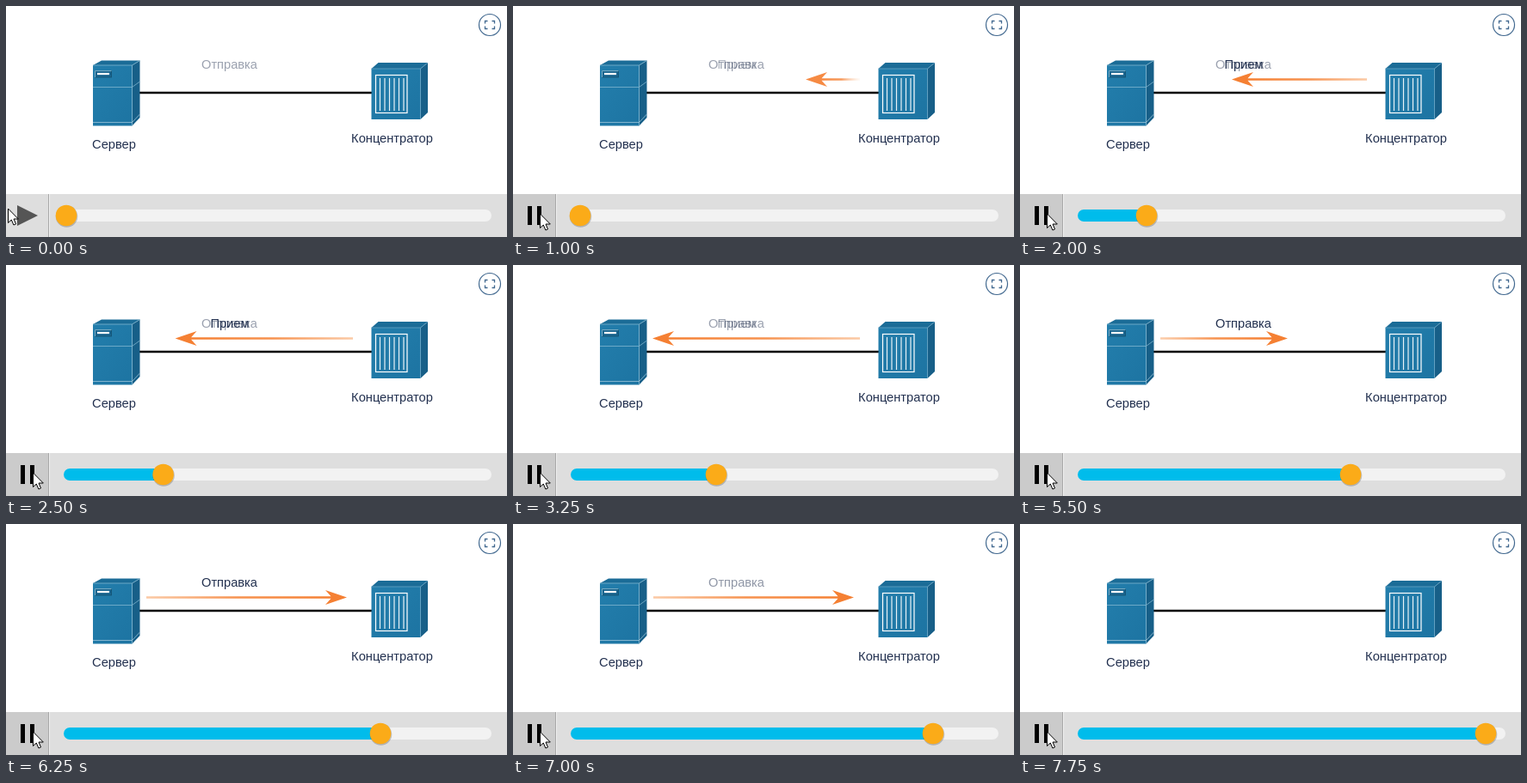
An HTML page for the animation above (8 s loop, 582 by 269 pixels).

```html
<!DOCTYPE html>
<html lang="ru">
<head>
<meta charset="utf-8">
<style>
  html, body { margin: 0; width: 100%; height: 100%; overflow: hidden; background: #fff; }
  svg { display: block; width: 582px; height: 269px; }
  text { font: 14.67px "Liberation Sans", Arial, sans-serif; fill: #22304f; text-anchor: middle; }
</style>
</head>
<body>
<svg viewBox="0 0 582 269">
  <defs>
    <linearGradient id="fade" gradientUnits="userSpaceOnUse" x1="20" x2="240" y1="0" y2="0">
      <stop offset="0" stop-color="#f58033"/>
      <stop offset=".5" stop-color="#f6924f"/>
      <stop id="tail" offset="1" stop-color="#fbcaa6"/>
    </linearGradient>
    <linearGradient id="face" x1="0" x2="1" y1="0" y2="1">
      <stop offset="0" stop-color="#237eac"/>
      <stop offset="1" stop-color="#1d74a2"/>
    </linearGradient>
  </defs>
  <rect width="582" height="269" fill="#fff"/>

  <g fill="none" stroke="#41688f">
    <circle cx="562" cy="22" r="12.5" stroke-width="1.2"/>
    <path d="M556.5 20.5v-3h3M564.5 17.5h3v3M567.5 23.5v3h-3M559.5 26.5h-3v-3" stroke-width="1.3"/>
  </g>

  <path d="M154 101H425" stroke="#000" stroke-width="2.6"/>

  <g id="server">
    <path d="M101 69L111 63.5H155.5L146.500 69Z" fill="#1b6c97"/>
    <path d="M146.500 69L155.500 63.500V130L146.500 139.500Z" fill="#175f88"/>
    <rect x="101" y="69" width="45.500" height="70.500" fill="url(#face)"/>
    <path d="M101 69H146.500L155.500 63.500M146.500 69V139.500M101 94.500H146.500L155.500 88" fill="none" stroke="#7fb5d0" stroke-width=".8"/>
    <path d="M101 135.500H146.500L155.500 126" fill="none" stroke="#9cc5da" stroke-width=".8"/>
    <rect x="103.500" y="75.500" width="19" height="7.500" fill="#1a658f" stroke="#12506f" stroke-width=".8"/>
    <path d="M103.500 83V75.500H122.500" fill="none" stroke="#8fbfd6" stroke-width=".8"/>
    <path d="M106 79H120" stroke="#fff" stroke-width="2.200"/>
  </g>

  <g id="hub">
    <path d="M424.500 73L432.500 66H490L481.500 73Z" fill="#1b6c97"/>
    <path d="M481.500 73L490 66V124L481.500 132Z" fill="#175f88"/>
    <rect x="424.500" y="73" width="57" height="59" fill="url(#face)"/>
    <path d="M424.500 73H481.500L490 66M481.500 73V132" fill="none" stroke="#66a4c4" stroke-width=".8"/>
    <rect x="429.500" y="80.500" width="36.500" height="44" fill="none" stroke="#fff" stroke-width="1.200"/>
    <path d="M434.500 84V122M440 84V122M445.500 84V122M451 84V122M456.500 84V122M462 84V122" stroke="#e8f2f7" stroke-width="1.200"/>
  </g>

  <text x="125.500" y="166">Сервер</text>
  <text x="448.500" y="159">Концентратор</text>
  <text id="send" x="259.500" y="73">Отправка</text>
  <text id="receive" x="260" y="73">Прием</text>

  <path id="arrow" fill="url(#fade)"/>

  <rect y="219" width="582" height="50" fill="#dedede"/>
  <rect id="button" y="219" width="49" height="50"/>
  <path d="M49.500 219V269" stroke="#a8a8a8"/>
  <path d="M50.500 219V269" stroke="#f0f0f0"/>
  <path id="play" d="M13 232L37 244L13 256Z" fill="#555"/>
  <path id="pause" d="M17 233h5v22h-5zM28 233h5v22h-5z" fill="#000"/>
  <rect x="67" y="237" width="497" height="14" rx="7" fill="#f2f2f2"/>
  <rect id="fill" x="67" y="237" height="14" rx="7" fill="#00bceb"/>
  <g id="knob">
    <circle cx=".5" cy="1" r="12.800" fill="#000" opacity=".2"/>
    <circle r="12.300" fill="#fbab18"/>
  </g>
  <path id="cursor" d="M0 0V16.500L3.800 13L6.400 19L9 17.900L6.500 12H11.800Z" fill="#fff" stroke="#000" stroke-linejoin="round"/>
</svg>
<script>
  const LOOP = 8000, STEP = 250;
  const $ = id => document.getElementById(id);
  const set = (id, attrs) => {
    for (const k in attrs) $(id).setAttribute(k, attrs[k]);
  };

  // Linear interpolation through [time, value] pairs
  function track(t, keys) {
    if (t <= keys[0][0]) return keys[0][1];
    for (let i = 1; i < keys.length; i++) {
      const [a, u] = keys[i - 1], [b, v] = keys[i];
      if (t <= b) return u + (v - u) * (t - a) / (b - a);
    }
    return keys[keys.length - 1][1];
  }

  // Arrow drawn pointing left from its tip at 0
  function drawArrow(t) {
    const back = t < 4250;
    const tip = back
      ? track(t, [[1000, 340], [2000, 246], [2850, 162]])
      : track(t, [[4750, 226], [6250, 396]]);
    const len = back ? 403 - tip : tip - 163;
    const alpha = back
      ? track(t, [[750, 0], [1000, .92], [1250, 1], [3250, 1], [3750, 0]])
      : track(t, [[4500, 0], [4750, .92], [5000, 1], [7000, 1], [7750, 0]]);
    set('arrow', {
      d: `M0 0L25 -8.500L18.500 -1.300H${len}V1.300H18.500L25 8.500Z`,
      transform: `translate(${tip} 85.500) scale(${back ? 1 : -1} 1)`,
      opacity: alpha
    });
    set('fade', { x2: len });
    set('tail', { 'stop-opacity': track(len, [[63, .1], [155, 1]]) });
  }

  function draw(t) {
    const playing = t >= 1000;
    const knob = track(t, [[880, 70], [1000, 78], [2000, 147], [3250, 236], [4500, 316], [6250, 435], [7750, 541]]);
    drawArrow(t);
    set('send', { opacity: track(t, [[4500, .45], [5000, 1], [6500, 1], [7500, 0]]) * (t < 7750) });
    set('receive', { opacity: track(t, [[750, 0], [1000, .35], [1500, 1], [2750, 1], [3250, .45], [3750, 0]]) });
    set('button', { fill: t < STEP ? '#dedede' : '#cbcbcb' });
    set('play', { opacity: playing ? 0 : 1 });
    set('pause', { opacity: playing ? 1 : 0 });
    set('fill', { width: playing ? knob - 67 : 0 });
    set('knob', { transform: `translate(${knob} 244)` });
    const x = track(t, [[0, 2.500], [500, 31.500]]);
    const y = track(t, [[0, 236], [500, 242]]);
    set('cursor', { transform: `translate(${x} ${y})` });
  }

  const start = performance.now();
  function tick() {
    const t = (performance.now() - start) % LOOP;
    draw(Math.floor(t / STEP) * STEP);
    requestAnimationFrame(tick);
  }
  draw(0);
  requestAnimationFrame(tick);
</script>
</body>
</html>
```
